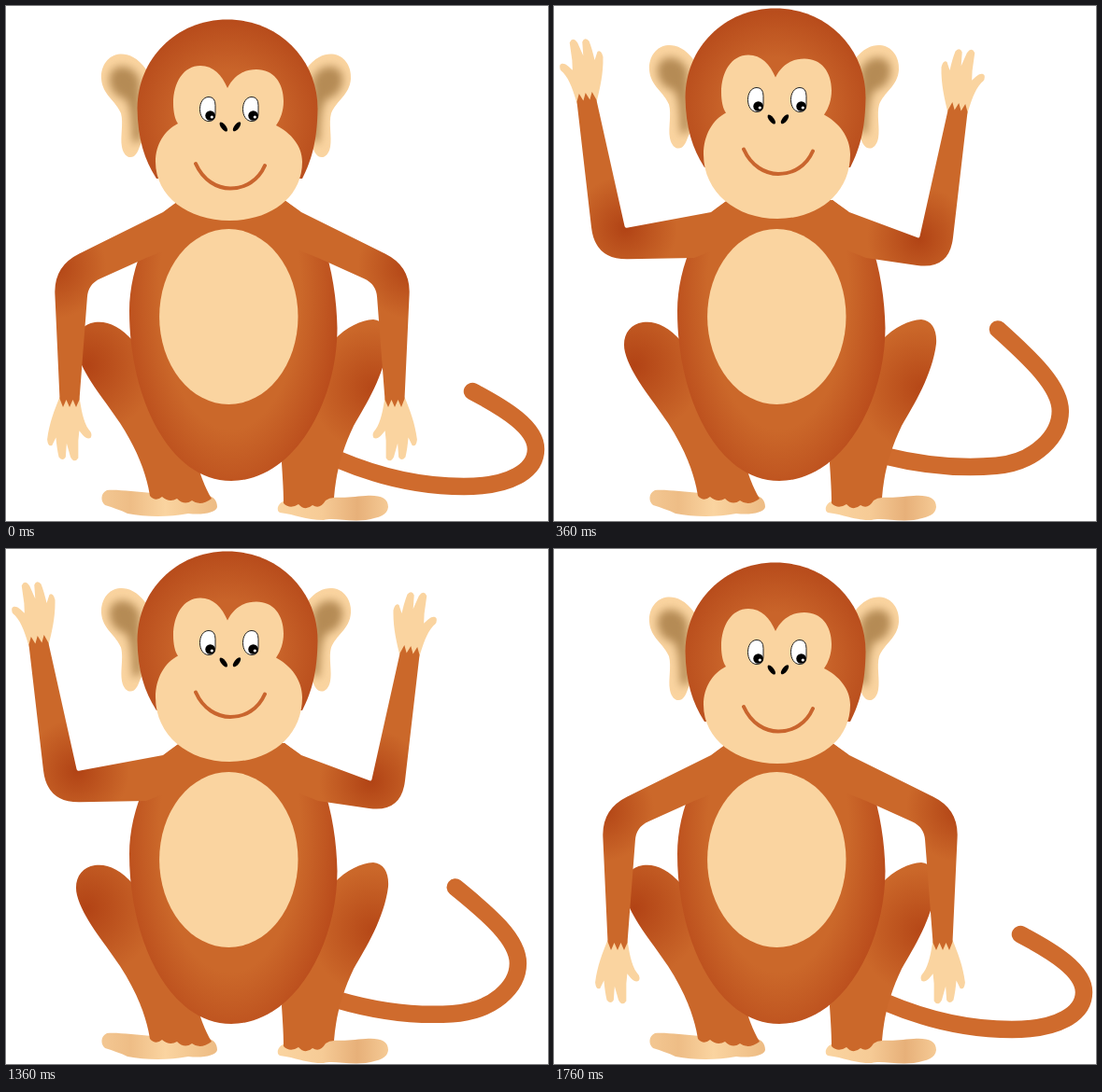
An HTML page that plays this animation: 580x552 px, repeating every 2000 ms.

```html
<!DOCTYPE html>
<html lang="en">
<head>
<meta charset="utf-8">
<title>Monkey raising its arms</title>
<style>
  html, body { margin: 0; width: 100%; height: 100%; overflow: hidden; background: #fff; }
  svg { display: block; width: 100%; height: 100%; }
</style>
</head>
<body>
<svg viewBox="0 0 580 552" xmlns="http://www.w3.org/2000/svg">
  <defs>
    <radialGradient id="bodyFill" gradientUnits="userSpaceOnUse" cx="0" cy="0" r="1"
      gradientTransform="translate(240 305) scale(122 240)">
      <stop offset=".62" stop-color="#cb682a"/><stop offset="1" stop-color="#b8491a"/>
    </radialGradient>
    <radialGradient id="skullFill" gradientUnits="userSpaceOnUse" cx="237" cy="122" r="108">
      <stop offset=".5" stop-color="#c9642a"/><stop offset="1" stop-color="#b74b1b"/>
    </radialGradient>
    <radialGradient id="legFillL" gradientUnits="userSpaceOnUse" cx="86" cy="385" r="75">
      <stop offset="0" stop-color="#b24315"/><stop offset="1" stop-color="#ca672a"/>
    </radialGradient>
    <radialGradient id="legFillR" gradientUnits="userSpaceOnUse" cx="394" cy="410" r="68">
      <stop offset="0" stop-color="#b54717"/><stop offset="1" stop-color="#cb682a"/>
    </radialGradient>
    <linearGradient id="footFillL">
      <stop offset="0" stop-color="#f3c792"/><stop offset=".25" stop-color="#eebd86"/>
      <stop offset=".55" stop-color="#fad4a0"/><stop offset="1" stop-color="#edbb83"/>
    </linearGradient>
    <linearGradient id="footFillR">
      <stop offset="0" stop-color="#fad4a0"/><stop offset=".4" stop-color="#f6cb96"/>
      <stop offset=".72" stop-color="#e7b079"/><stop offset="1" stop-color="#f5ca95"/>
    </linearGradient>
    <radialGradient id="armFillL" gradientUnits="userSpaceOnUse" r="56">
      <stop offset="0" stop-color="#b14315"/><stop offset="1" stop-color="#cb682a"/>
    </radialGradient>
    <radialGradient id="armFillR" href="#armFillL"/>
    <filter id="soft" x="-50%" y="-50%" width="200%" height="200%"><feGaussianBlur stdDeviation="5"/></filter>
    <path id="earShape" d="M150 68C140 54 130 51 122 51.500C110 52 101 64 102 78C103 95 118 102 123 115C126 126 122 140 124 151C126 161 132 164 137 161C143 156 142 149 147 144L150 140Z"/>
    <clipPath id="earClip"><use href="#earShape"/></clipPath>
    <g id="ear">
      <use href="#earShape" fill="#fad4a0"/>
      <g clip-path="url(#earClip)">
        <path d="M111 74C116 60 136 62 143 78L146 142L136 148C134 134 136 112 128 100C115 97 109 86 111 74Z" fill="#b58b54" filter="url(#soft)"/>
      </g>
    </g>
    <path id="hand" fill="#fad4a0" d="M-10-2C-15 10-21 25-23 42Q-22 50-18 48L-14 40Q-13 52-11 60Q-7 65-4 60L-3 46L1 60Q5 67 9 61L9 43L10 33C14 38 18 43 22 40Q24 36 20 32C14 24 12 10 10-2Z"/>
    <g id="eye">
      <path d="M1-13Q8-13 8-4V5Q8 13 1 13C-5 13-8.500 7-8.500 0C-8.500-7-5-13 1-13Z" fill="#fff" stroke="#222"/>
      <circle cx="2.600" cy="7" r="5.300"/>
      <circle cx="4.300" cy="8.500" r="1.600" fill="#fff"/>
    </g>
  </defs>

  <path id="tail" fill="none" stroke="#cf6b2d" stroke-width="18.500" stroke-linecap="round"/>

  <path fill="url(#footFillL)" d="M156 522C140 521 120 518 108 519C101 522 101 531 106 535C115 538 122 540 130 544C150 548 175 548 195 544C210 546 225 543 226 537C226 530 222 525 215 525Z"/>
  <path fill="url(#footFillR)" d="M299 530C290 533 289 541 293 543C310 545 320 551 340 551C350 548 365 553 385 551C400 548 408 546 409 537C409 527 400 524 385 525C370 526 355 528 348 526Z"/>
  <path fill="url(#legFillL)" d="M136 359C122 343 108 337 95 339C80 341 72 355 76 371C82 395 104 420 122 447C140 475 150 500 154 525Q160 532 167 526Q175 533 183 528Q191 536 199 530Q208 537 220 528C214 518 210 508 206 495L200 400Z"/>
  <path fill="url(#legFillR)" d="M350 359C365 343 380 337 393 336C405 337 410 348 409 362C405 395 385 428 372 450C360 475 353 500 351 527Q346 527 342 530Q336 540 328 535Q320 542 313 534Q304 540 297 533C297 520 296 505 295 490L300 400Z"/>

  <path fill="url(#bodyFill)" d="M186 208C175 216 168 220 160 232C142 262 132 295 132 327C132 420 175 509 241 509C308 509 354.500 425 354.500 345C354 312 348 275 336 245C322 222 310 218 298 208Z"/>
  <g><use id="handL" href="#hand"/><path id="armL" fill="url(#armFillL)"/></g>
  <g transform="translate(484) scale(-1 1)"><use id="handR" href="#hand"/><path id="armR" fill="url(#armFillR)"/></g>
  <ellipse cx="238.300" cy="333" rx="74.200" ry="94" fill="#fad4a0"/>

  <g id="ears"><use href="#ear"/><use href="#ear" transform="translate(471) scale(-1 1)"/></g>
  <path id="skull" fill="url(#skullFill)" d="M237 14.500C292 14.500 333.500 57 333.500 110C333 145 327 165 317 185L161 185C148 165 141 142 140.500 110C140.500 57 182 14.500 237 14.500Z"/>
  <path id="face" fill="#fad4a0"/>
  <g id="eyes"><use href="#eye" x="216" y="110.500"/><use href="#eye" x="262" y="110.500"/></g>
  <g id="nose">
    <ellipse rx="2.600" ry="6" transform="translate(232.800 129.500) rotate(-38)"/>
    <ellipse rx="2.600" ry="6" transform="translate(247 129.300) rotate(38)"/>
  </g>
  <path id="smile" d="M203 169C211 187 226 195.500 240 195.500C256 195.500 270 187 277 171" fill="none" stroke="#c9652e" stroke-width="4" stroke-linecap="round"/>
</svg>
<script>
const LOOP = 2000, STEP = 40;
const $ = id => document.getElementById(id);

// Left arm poses. top and under: elbow corners of the two edges; bend: their rounding;
// turn and len: the hand; skew: how far the right arm departs from the mirror image.
const poses = {
  hang:   { top: [51, 279], under: [88, 298], bend: [30, 14], wrist: [68, 421], turn: 0, len: 1.04, skew: [0, 0] },
  lifted: { top: [48, 270], under: [86, 296], bend: [30, 14], wrist: [61, 360], turn: 6, len: 0.84, skew: [5, 3] },
  bent:   { top: [62, 248], under: [29, 293], bend: [2, 35], wrist: [41, 185], turn: 172, len: 0.95, skew: [12, 5] },
  raised: { top: [76, 238], under: [44, 272], bend: [2, 35], wrist: [35, 102], turn: 172, len: 1.06, skew: [17, 11] }
};
const shoulder = [186, 208], nape = [168, 221], armpit = [150, 270], chest = [200, 250];

const tailLow = [355,486, 395,503, 440,515, 490,515, 567,498, 567,475, 535,432, 499,413];
const tailHigh = [355,480, 390,484, 425,484, 462,478, 525,435, 525,407, 497,345, 459,302];
const faceShape = "M237,88C231,74 222,64 208,64C190,64 179,82 179,104C179,114 181,122 184,126" +
  "C170,133 160,148 160,167C160,204 195,230 239,230C282,230 317,206 317,167" +
  "C317,150 305,136 289,128C294,121 297,112 297,102C297,82 286,68 268,68C253,68 243,76 237,88Z";

const mix = (a, b, k) => Array.isArray(a) ? a.map((v, i) => mix(v, b[i], k)) : a + (b - a) * k;
const toward = (p, q, d) => mix(p, q, d / Math.hypot(q[0] - p[0], q[1] - p[1]));
const corner = (from, p, to, r) => `L${toward(p, from, r)}Q${p} ${toward(p, to, r)}`;

// Ragged fur across the wrist, pointing along the hand.
function fur(a, b) {
  let d = "";
  for (let i = 1; i <= 6; i++) {
    const p = mix(a, b, i / 6), h = i % 2 ? 9 : 1;
    d += `L${p[0] - (b[1] - a[1]) * h / 21},${p[1] + (b[0] - a[0]) * h / 21}`;
  }
  return d;
}

function drawArm(side, from, to, k) {
  const pose = {};
  for (const key in from) pose[key] = mix(from[key], to[key], k);
  const place = p => side === "R" ? p.map((v, i) => v + pose.skew[i]) : p;
  const top = place(pose.top), under = place(pose.under), wrist = place(pose.wrist);

  const angle = pose.turn * Math.PI / 180, half = [10.5 * Math.cos(angle), 10.5 * Math.sin(angle)];
  const a = wrist.map((v, i) => v - half[i]), b = wrist.map((v, i) => v + half[i]);
  $("arm" + side).setAttribute("d",
    `M${shoulder}Q${mix(shoulder, nape, .6)} ${nape}${corner(nape, top, a, pose.bend[0])}L${a}${fur(a, b)}` +
    `${corner(b, under, armpit, pose.bend[1])}L${armpit}L${chest}Z`);
  $("hand" + side).setAttribute("transform",
    `translate(${wrist}) rotate(${pose.turn}) scale(1.04 ${pose.len})`);
  $("armFill" + side).setAttribute("cx", top[0]);
  $("armFill" + side).setAttribute("cy", top[1]);
}

const raise = (id, dy) => $(id).setAttribute("transform", `translate(0 ${-dy})`);

function draw(ms) {
  const t = ms % LOOP;
  const ramp = (start, steps) =>
    Math.min(steps, Math.max(0, Math.floor((t - start) / STEP) + 1)) / steps;

  const wag = ramp(160, 10) - ramp(1160, 11);
  const n = mix(tailLow, tailHigh, wag);
  $("tail").setAttribute("d", `M${n.slice(0, 2)}C${n.slice(2, 8)}S${n.slice(8)}`);

  // The forearm shortens, flips over, then lengthens again.
  const up = t >= 240 && t < 1520;
  const reach = up ? ramp(280, 3) - ramp(1400, 3) : 1 - ramp(160, 2) + ramp(1560, 4);
  for (const side of "LR") {
    if (up) drawArm(side, poses.bent, poses.raised, reach);
    else drawArm(side, poses.lifted, poses.hang, reach);
  }

  const lift = ramp(160, 6) - ramp(1560, 6);
  raise("skull", 12 * lift);
  raise("ears", 9.5 * lift);
  raise("eyes", 10 * lift);
  raise("nose", 8 * lift);
  raise("smile", 15.5 * lift);
  // The chin stays almost still while the brow rises.
  $("face").setAttribute("d", faceShape.replace(/(\d+),(\d+)/g, (_, x, y) =>
    `${x},${y - lift * (11.5 - 9.5 * Math.max(0, y - 130) / 100)}`));
}

const begin = performance.now();
function tick() {
  draw(performance.now() - begin);
  requestAnimationFrame(tick);
}
tick();
</script>
</body>
</html>
```
